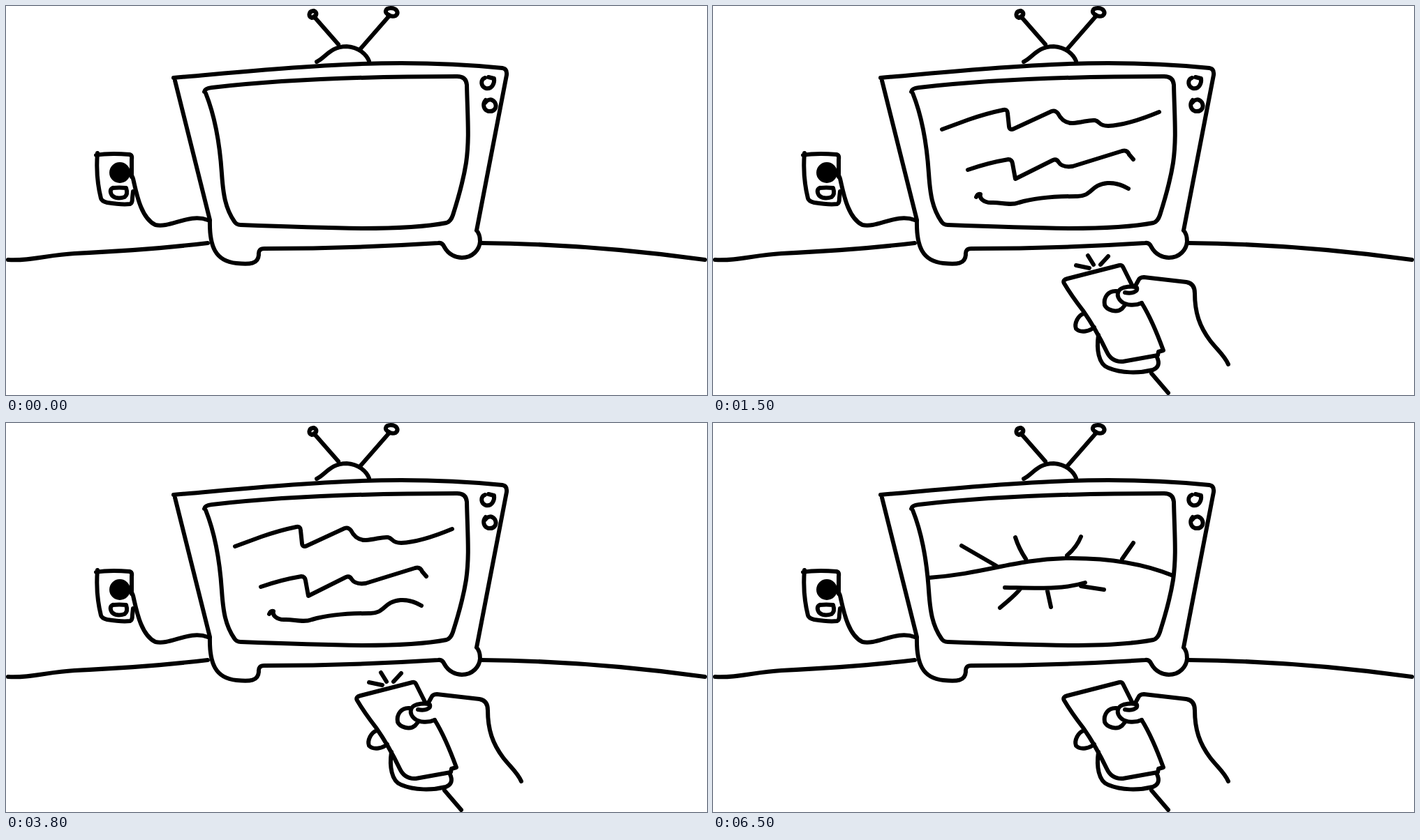
Animation, 1004 px wide and 558 px high, one loop 7000 ms. Source, as an HTML page:

```html
<!DOCTYPE html>
<html lang="en">
<head>
<meta charset="utf-8">
<title>Television sketch</title>
<style>
html, body { margin: 0; width: 100%; height: 100%; overflow: hidden; background: #fff; }
svg { display: block; width: 100%; height: 100%; fill: none; stroke: #000; stroke-width: 6; stroke-linecap: round; stroke-linejoin: round; }
.hand, .scene { animation: 7s step-end infinite; }
.scene { visibility: hidden; }
.hand { animation-name: raise; }
.static { animation-name: static; }
.dance-a { animation-name: dance-a; }
.dance-b { animation-name: dance-b; }
.talk { animation-name: talk; }
.talk-a { animation-name: talk-a; }
.talk-b { animation-name: talk-b; }
.sea { animation-name: sea; }
.ship { animation: bob 7s step-end infinite; }
.eye-open { animation-name: eye-open; }
.eye-shut { animation-name: eye-shut; }

@keyframes raise {
  0% { transform: translateY(220px); }
  2.857% { transform: translateY(156px); animation-timing-function: steps(12); }
  19.999%, 100% { transform: none; }
}
@keyframes static {
  0%, 26.428%, 48.571%, 59.285%, 71.428% { visibility: hidden; }
  21.428%, 43.571%, 54.285%, 66.428% { visibility: visible; }
}
@keyframes dance-a {
  0%, 30.714%, 39.285% { visibility: hidden; }
  26.428%, 34.999% { visibility: visible; }
}
@keyframes dance-b {
  0%, 34.999%, 43.571% { visibility: hidden; }
  30.714%, 39.285% { visibility: visible; }
}
@keyframes talk {
  0%, 54.285% { visibility: hidden; }
  48.571% { visibility: visible; }
}
@keyframes talk-a {
  0%, 49.999%, 52.857% { visibility: hidden; }
  48.571%, 51.428% { visibility: visible; }
}
@keyframes talk-b {
  0%, 51.428%, 54.285% { visibility: hidden; }
  49.999%, 52.857% { visibility: visible; }
}
@keyframes sea {
  0%, 66.428% { visibility: hidden; }
  59.285% { visibility: visible; }
}
@keyframes bob {
  0%, 60.714%, 63.571% { transform: none; }
  59.285%, 62.142%, 64.999% { transform: translateY(-6px); }
}
@keyframes eye-open {
  0%, 78.571%, 92.857% { visibility: hidden; }
  71.428%, 85.714% { visibility: visible; }
}
@keyframes eye-shut {
  0%, 85.714% { visibility: hidden; }
  78.571%, 92.857% { visibility: visible; }
}
</style>
</head>
<body>
<svg viewBox="0 0 1004 558" preserveAspectRatio="none">
  <defs>
    <path id="figure-a" d="M14,148A14,14 0 1 1 -14,148A14,14 0 1 1 14,148M0,162V232M-45,182L0,192L44,216M-26,279L0,232L20,279"/>
    <path id="figure-b" d="M14,148A14,14 0 1 1 -14,148A14,14 0 1 1 14,148M0,162V232M-44,216L0,192L45,182M-14,279L0,232L32,274"/>
  </defs>

  <!-- floor -->
  <path d="M3,364C35,366 60,357 98,355C160,352 230,347 289,340M681,340C790,341 900,350 1001,364"/>

  <!-- socket and cord -->
  <path d="M129,214C145,211 165,212 177,213Q181,214 180,220V245M131,211C129,235 132,260 136,276Q137,280 145,282C157,284 170,285 178,284Q181,283 181,275L182,266"/>
  <path d="M153,261Q162,260 172,261Q175,270 170,274Q159,278 152,272Q147,264 153,261"/>
  <circle cx="163" cy="239" r="12" fill="#000"/>
  <path d="M175,241Q181,240 183,252C188,275 195,305 214,314C235,319 262,297 289,307"/>

  <!-- television -->
  <path d="M240,103C330,95 400,88 486,84C570,80 640,82 711,89Q718,90 717,99L674,322M242,107L292,307C291,345 300,366 330,369C350,371 361,370 362,357Q361,348 370,348C460,348 540,345 619,340Q625,339 628,346C634,357 645,361 653,361C668,361 678,350 679,338Q679,327 674,322"/>
  <path d="M284,123Q285,118 295,117C400,105 520,101 646,101Q659,101 660,113C661,160 664,190 659,225C655,250 648,275 640,300Q637,309 631,311C600,317 550,319 510,319C450,318 390,316 336,314Q330,314 327,309C314,290 311,270 309,240C306,195 298,155 286,125"/>
  <path d="M686,103C679,106 680,115 687,118C696,120 700,111 699,104L691,102M687,135C682,141 684,149 691,151C700,152 704,145 700,138C696,133 690,133 686,139"/>
  <path d="M445,80C458,74 464,58 488,58C505,59 516,69 520,79M476,55L441,15M508,61L549,14"/>
  <path d="M440,7C433,8 433,15 438,17C444,17 447,10 441,7M549,13C541,10 543,3 551,3C560,3 563,10 558,14Q553,16 547,13"/>

  <!-- noise between channels, with the remote's signal -->
  <g class="scene static">
    <path d="M328,177L366,163Q392,154 416,149Q422,148 422,154L424,173Q425,179 431,176L485,151Q490,149 494,154Q501,168 515,168C530,167 538,163 547,164C554,165 552,172 566,172C590,171 615,162 639,152"/>
    <path d="M365,235C385,228 405,223 423,220Q428,220 429,226L433,248L487,221Q492,219 495,224Q500,232 515,230L586,208Q593,206 596,213L602,220"/>
    <path d="M377,274Q379,269 383,270C381,276 388,282 398,282C412,281 425,287 438,282C465,274 495,273 520,273C543,274 540,256 565,254Q580,253 595,262"/>
    <path d="M520,372L539,376M537,358L545,371M566,359L555,371"/>
  </g>

  <!-- dancers -->
  <g class="scene dance-a">
    <use href="#figure-a" x="392"/><use href="#figure-b" x="498"/><use href="#figure-a" x="604"/>
  </g>
  <g class="scene dance-b">
    <use href="#figure-b" x="392"/><use href="#figure-a" x="498"/><use href="#figure-b" x="604"/>
  </g>

  <!-- speaker -->
  <path class="scene talk" d="M436,176C436,102 532,102 532,176C532,248 436,248 436,176M467,165V171M501,165V171M390,312C395,260 430,242 462,240V226M506,226V240C540,242 574,262 578,312"/>
  <path class="scene talk-a" d="M466,200H502"/>
  <path class="scene talk-b" d="M466,198C472,220 496,220 502,198Z"/>

  <!-- ship at sea -->
  <g class="scene sea">
    <g class="ship">
      <path d="M349,210L391,205Q395,206 397,213Q402,224 412,219C425,213 440,215 470,213C520,210 560,199 592,183Q601,178 599,187C590,199 577,215 562,246M349,210L353,243Q355,247 364,247Q373,249 384,262"/>
      <path d="M442,136C425,157 400,182 368,205M446,139C437,160 438,185 441,206C428,194 412,188 393,186M442,135C458,133 475,121 498,122Q515,123 522,135Q529,147 526,174Q525,180 515,182C498,186 480,188 462,190Q468,187 467,180C463,160 457,146 448,137M522,136C545,160 570,168 596,182M469,188L474,211M492,189L497,211"/>
    </g>
    <path d="M316,282Q333,277 344,263C355,269 370,270 386,262Q408,263 416,257Q423,252 431,256C450,263 460,257 472,254Q484,262 496,258Q509,250 518,252C540,257 555,255 566,247Q580,251 589,248Q598,245 605,248Q616,250 626,247Q640,252 657,253"/>
  </g>

  <!-- blinking eye -->
  <path class="scene eye-open" d="M309,222C390,135 570,130 656,219M309,222C390,295 570,300 656,219M362,143L388,168M437,117L447,147M529,117L519,147M601,140L582,167M411,303L423,273M484,309V281M549,300L539,273M526,214A42,42 0 1 1 442,214A42,42 0 1 1 526,214"/>
  <g class="scene eye-shut">
    <path d="M309,222C390,216 430,196 505,194C570,193 620,203 659,219M356,176L406,205M433,164Q438,180 448,195M527,163Q521,178 507,190M602,172L586,195"/>
    <path d="M418,236C470,237 500,239 533,229M527,234L560,239M440,238Q434,246 411,265M479,241L484,264"/>
  </g>

  <!-- hand with remote -->
  <g class="hand">
    <path d="M601,402L588,376Q586,371 582,372L508,391Q500,393 503,398Q513,415 530,437C544,457 553,473 564,496Q571,511 587,510L637,501L638,496L645,494C637,472 627,447 614,426"/>
    <path d="M604,403L609,394Q611,389 617,389L678,396Q690,398 690,412C690,440 697,460 712,480C722,493 733,502 738,514"/>
    <path d="M614,426C605,430 592,430 585,424C577,417 578,407 588,404C596,402 604,402 607,404C609,410 600,413 590,411M578,409C566,408 559,418 561,429C564,436 578,441 586,434L590,429"/>
    <path d="M531,441C523,444 517,455 520,463C527,470 540,466 546,461M552,472C549,492 552,514 566,519C585,527 610,527 630,522Q642,517 636,504M628,527L652,555"/>
  </g>
</svg>
</body>
</html>
```
